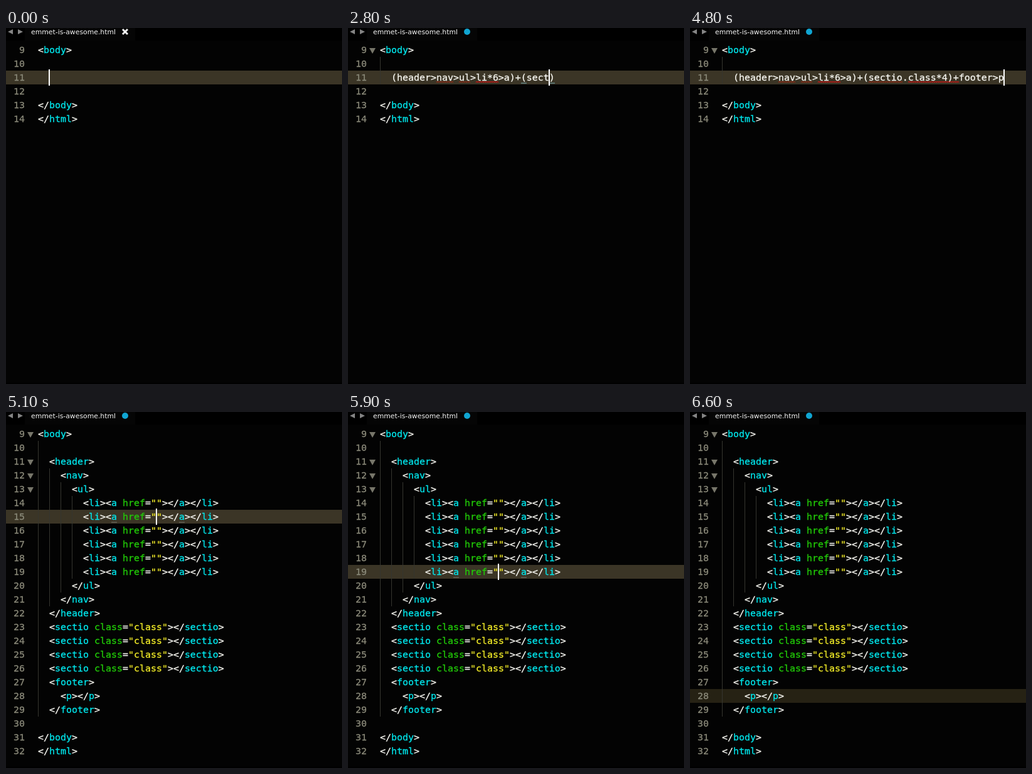
An HTML page for the animation above (6.7 s loop, 536 by 568 pixels).

```html
<!DOCTYPE html>
<html lang="en">
<head>
<meta charset="utf-8">
<title>Abbreviation expansion</title>
<style>
html, body { margin: 0; width: 100%; height: 100%; overflow: hidden; background: #030303; }
svg { display: block; width: 536px; height: 568px; }
.code { font: 14.95px "DejaVu Sans Mono", monospace; fill: #f8f8f2; stroke: #f8f8f2; stroke-width: .3px; }
.tag { fill: #00e8ee; stroke: #00e8ee; }
.attr { fill: #22cc08; stroke: #22cc08; }
.str { fill: #f4ee28; stroke: #f4ee28; }
.num { fill: #8c8b7b; stroke: #8c8b7b; text-anchor: end; }
.title { font: 10.85px "DejaVu Sans", sans-serif; fill: #f4f4f4; }
</style>
</head>
<body>
<svg id="stage" viewBox="0 0 536 568">
  <rect width="536" height="568" fill="#030303"/>
  <rect width="536" height="20" fill="#000"/>
  <rect x="30" width="176" height="20" fill="#050505"/>
  <rect y="566" width="536" height="2" fill="#000"/>
  <path d="M11 2v8l-8-4zM19 2v8l8-4z" fill="#858585"/>
  <text class="title" x="40" y="10">emmet-is-awesome.html</text>
  <g id="view"></g>
</svg>
<script>
const STEP = 100, LOOP = 6700;
const COL = 9, ROW = 22, LEFT = 51, FIRST = 9;
const TYPED = '(header>nav>ul>li*6>a)+(sectio.class*4)+footer>p';
const EXPAND = TYPED.length + 1;
const DULL = '#a82c14', BRIGHT = '#f01010';

// Bracket pairs: column of "(" and of the typed ")"
const PAIRS = [[0, 21], [23, 38]];
// Spelling marks: start, end, caret position that reveals them, colour
const MARKS = [[8, 11, 12, DULL], [12, 14, 15, DULL], [15, 19, 20, BRIGHT],
               [24, 30, 31, DULL], [31, 40, 37, BRIGHT]];

const repeat = (n, line) => Array(n).fill(line);
const before = ['<body>', '', '', '', '</body>', '</html>'];
const after = [
  '<body>', '', '  <header>', '    <nav>', '      <ul>',
  ...repeat(6, '        <li><a href=""></a></li>'),
  '      </ul>', '    </nav>', '  </header>',
  ...repeat(4, '  <sectio class="class"></sectio>'),
  '  <footer>', '    <p></p>', '  </footer>', '', '</body>', '</html>'
];

// Tab stops: row, caret column, name columns to underline, name length
const stops = [];
for (let row = 14; row < 20; row++)
  for (const col of [21, 23]) stops.push([row, col, [13, 25], 1]);
for (let row = 23; row < 27; row++) stops.push([row, 24, [3, 26], 6]);
stops.push([28, 7, [5, 9], 1]);

const view = document.getElementById('view');
const x = col => LEFT + COL * col;
const y = row => 24 + ROW * (row - FIRST);
const esc = s => s.replace(/&/g, '&amp;').replace(/</g, '&lt;').replace(/>/g, '&gt;');
const rect = (l, t, w, h, fill) =>
  `<rect x="${l}" y="${t}" width="${w}" height="${h}" fill="${fill}"/>`;
const text = (cls, l, row, body) =>
  `<text class="code ${cls}" x="${l}" y="${y(row) + 16}">${body}</text>`;
const band = (row, fill = '#3b3526') => rect(0, y(row), 536, ROW, fill);
const caret = (row, col) => rect(x(col) - 1, y(row) - 2, 2, 26, '#fff');
const guide = (col, from, to) =>
  rect(x(col), y(from), 1, ROW * (to - from + 1), '#35352f');
const fold = row => `<path d="M34 ${y(row) + 8}h10l-5 9z" fill="#77766a"/>`;
const underline = (row, col, n, fill) => rect(x(col), y(row) + 19.5, COL * n, 1, fill);

function squiggle(from, to, color) {
  const waves = 'l1.5-2 1.5 2'.repeat((to - from) * COL / 3);
  return `<path d="M${x(from + 2)} ${y(11) + 19}${waves}" fill="none" stroke="${color}"/>`;
}

function paint(line) {
  const wrap = (cls, s) => `<tspan class="${cls}">${esc(s)}</tspan>`;
  return line.replace(/(<\/?)(\w+)|"\w*"|\w+|[^\w"<]/g, (token, open, name) => {
    if (name) return esc(open) + wrap('tag', name);
    if (token[0] === '"') return wrap('str', token);
    return /\w/.test(token) ? wrap('attr', token) : esc(token);
  });
}

function lines(list) {
  return list.map((line, i) => {
    const body = line.trimStart(), row = FIRST + i;
    return text('num', 30, row, row) +
      (body && text('', x(line.length - body.length), row, paint(body)));
  }).join('');
}

function typing(n) {
  let out = band(11);
  if (n) out += guide(0, 10, 11) + fold(9);
  out += lines(before);
  const pair = PAIRS.find(([a, b]) => n > a && n <= b + 1);
  const pending = pair && n <= pair[1];
  if (n) out += text('', x(2), 11, esc(TYPED.slice(0, n) + (pending ? ')' : '')));
  for (const [from, to, shown, color] of MARKS)
    if (n >= shown) out += squiggle(from, Math.min(to, n), color);
  if (pair)
    for (const col of [pair[0], pending ? n : pair[1]])
      out += underline(11, col + 2, 1, '#79aeb4');
  return out + caret(11, n + 2);
}

function expanded(k) {
  const idle = k >= stops.length;
  const [row, col, names, len] = stops[Math.min(k, stops.length - 1)];
  let out = band(row, idle ? '#262214' : undefined);
  out += guide(0, 10, 29) + guide(1 * 2, 12, 21) + guide(4, 13, 20) + guide(6, 14, 19);
  out += [9, 11, 12, 13].map(fold).join('') + lines(after);
  if (idle) return out;
  for (const c of names) out += underline(row, c, len, '#77776c');
  return out + caret(row, col);
}

function tabMark(step) {
  return step
    ? '<circle cx="190" cy="6" r="5" fill="#10a5d2"/>'
    : '<path d="M186 2l8 8M194 2l-8 8" stroke="#f4f4f4" stroke-width="3"/>';
}

let shown = -1;
function draw(step) {
  if (step === shown) return;
  shown = step;
  view.innerHTML = tabMark(step) + (step < EXPAND ? typing(step) : expanded(step - EXPAND));
}

const start = performance.now();
function tick() {
  draw(Math.floor((performance.now() - start) % LOOP / STEP));
  requestAnimationFrame(tick);
}
tick();
</script>
</body>
</html>
```
